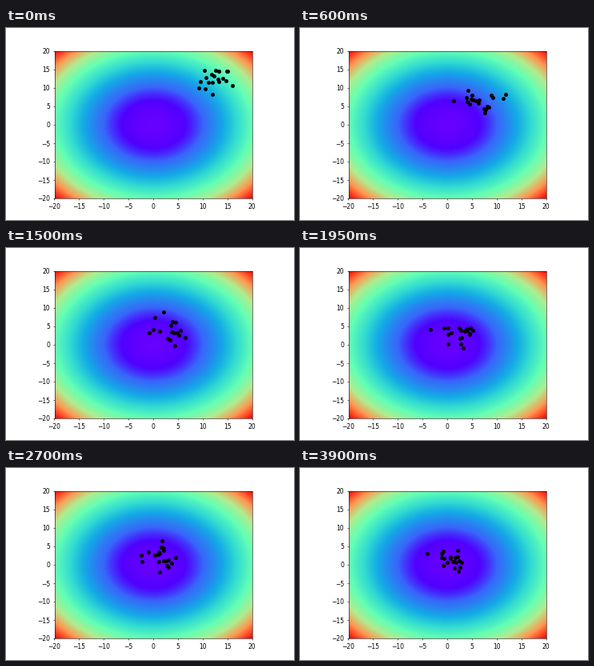
A matplotlib script that plays this animation: 360 by 240 pixels, repeating every 4.05 s.

```python
import numpy as np
import matplotlib.pyplot as plt
from matplotlib.animation import FuncAnimation
from matplotlib.colors import LinearSegmentedColormap

FRAMES, STEP_MS, LIMIT, COUNT = 27, 150, 20, 20
WIDTH, HEIGHT, DPI = 360, 240, 50


def centre(step):
    """Swarm centre, sliding down the bowl fast at first, then slowly."""
    return 12.5 * np.exp(-np.array([0.21 * step**0.8, 0.27 * step**0.65]))


def search(keep=0.6, spread=2.1, seed=8):
    """Positions of all particles per step: drifting centre plus random walk."""
    rng = np.random.default_rng(seed)
    offset = rng.normal(scale=0.8 * spread, size=(COUNT, 2))
    path = []
    for step in range(FRAMES):
        path.append(centre(step) + offset - offset.mean(axis=0))
        kick = rng.normal(scale=spread, size=(COUNT, 2))
        offset = keep * offset + np.sqrt(1 - keep**2) * kick
    return path


cmap = LinearSegmentedColormap.from_list("bowl", [
    (0, "#6600ff"), (0.05, "#5000ff"), (0.125, "#3866fa"),
    (0.25, "#14aae6"), (0.36, "#32dcd0"), (0.5, "#64ffb4"),
    (0.65, "#b0ec8e"), (0.8, "#ff9650"), (1, "#ff0000"),
])

fig = plt.figure(figsize=(WIDTH / DPI, HEIGHT / DPI), dpi=DPI,
                 facecolor="white")
ax = fig.add_axes([60.5 / WIDTH, 27 / HEIGHT, 247 / WIDTH, 184 / HEIGHT])
grid = np.linspace(-LIMIT, LIMIT, 401)
x, y = np.meshgrid(grid, grid)
ax.imshow(x**2 + y**2, cmap=cmap, origin="lower", aspect="auto",
          extent=(-LIMIT, LIMIT, -LIMIT, LIMIT), interpolation="bilinear")
ticks = np.arange(-LIMIT, LIMIT + 1, 5)
ax.set(xlim=(-LIMIT, LIMIT), ylim=(-LIMIT, LIMIT), xticks=ticks, yticks=ticks)
ax.tick_params(labelsize=11, pad=4.5)
dots, = ax.plot([], [], "ko", markersize=6)
path = search()


def draw(step):
    dots.set_data(*path[step].T)
    return dots,


anim = FuncAnimation(fig, draw, frames=FRAMES, interval=STEP_MS,
                     repeat=True, repeat_delay=0)
plt.show()
```
